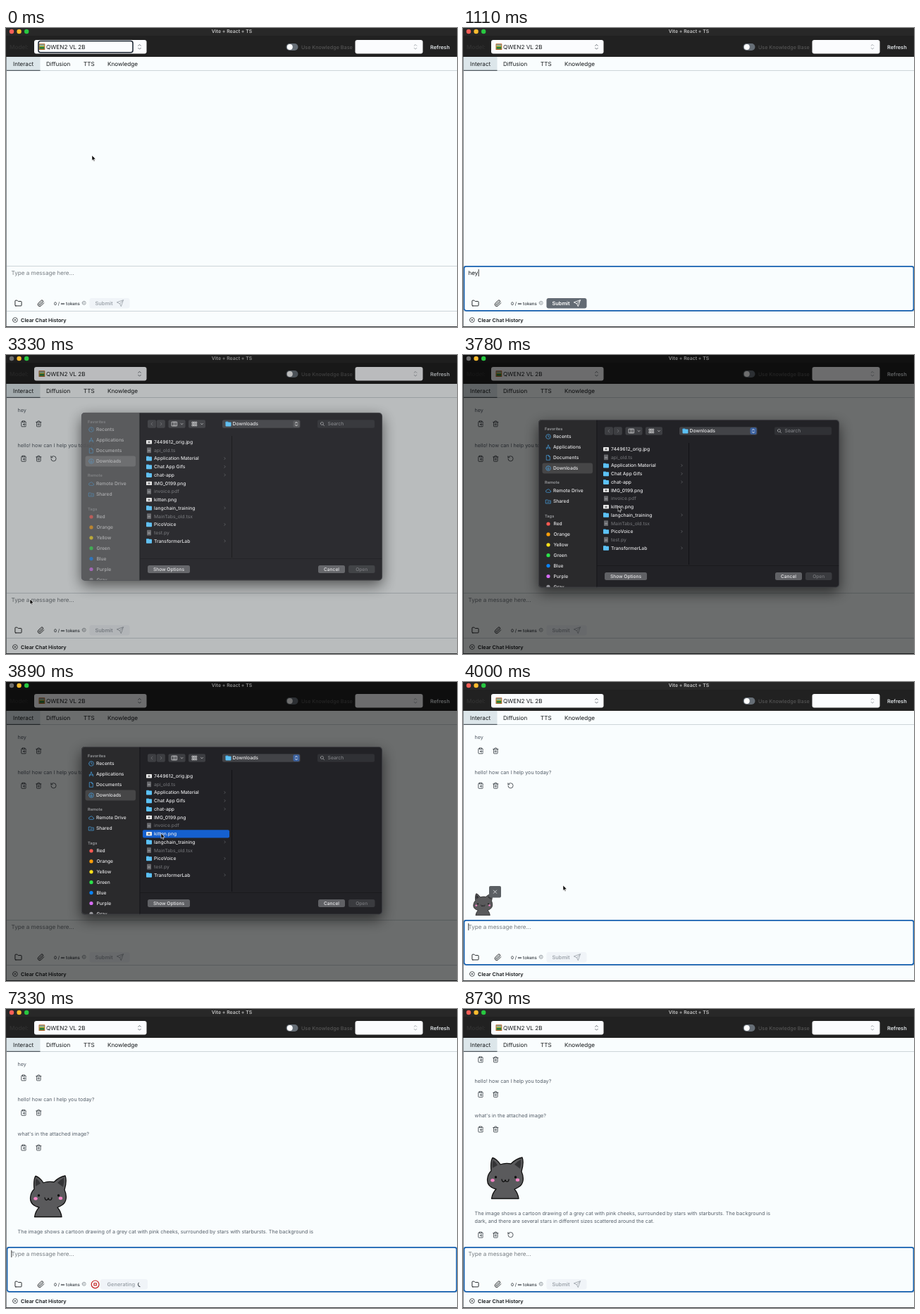
These frames come from a looping animation (640x425 px, 8.91 s). An HTML page:

```html
<!DOCTYPE html>
<html lang="en">
<head>
<meta charset="utf-8">
<title>Chat demo</title>
<style>
html, body { margin: 0; width: 100%; height: 100%; overflow: hidden; background: #f9fdfe; }
svg { display: block; width: 640px; height: 425px; text-rendering: geometricPrecision; }
text { font-family: Inter, "Open Sans", sans-serif; white-space: pre; }
.ico { fill: none; stroke-linecap: round; stroke-linejoin: round; }
</style>
</head>
<body>
<svg id="stage" viewBox="0 0 640 425" xmlns="http://www.w3.org/2000/svg"></svg>
<script>
const LOOP = 8910, STEP = 1000 / 9;

const ICONS = {
  folder: 'M4 20h16a2 2 0 0 0 2-2V8a2 2 0 0 0-2-2h-7.9a2 2 0 0 1-1.7-.9l-.8-1.2A2 2 0 0 0 7.9 3H4a2 2 0 0 0-2 2v13a2 2 0 0 0 2 2Z',
  clip: 'm21.4 11-9.2 9.2a6 6 0 0 1-8.5-8.5l8.6-8.6A4 4 0 1 1 18 8.8l-8.6 8.6a2 2 0 0 1-2.8-2.8l8.5-8.5',
  trash: 'M3 6h18M19 6v14a2 2 0 0 1-2 2H7a2 2 0 0 1-2-2V6M8 6V4a2 2 0 0 1 2-2h4a2 2 0 0 1 2 2v2M10 11v6M14 11v6',
  redo: 'M3 12a9 9 0 1 0 9-9 9.8 9.8 0 0 0-6.7 2.7L3 8M3 3v5h5',
  copy: 'M8 2h8v4H8zM8 4H6a2 2 0 0 0-2 2v14a2 2 0 0 0 2 2h12a2 2 0 0 0 2-2v-2M16 4h2a2 2 0 0 1 2 2v4M21 14H11M15 10l-4 4 4 4',
  send: 'm22 2-7 20-4-9-9-4ZM22 2 11 13',
  sort: 'm7 16 5 5 5-5M7 8l5-5 5 5',
  info: 'M2 12a10 10 0 1 0 20 0a10 10 0 1 0-20 0M12 16v-5M12 8v-.5',
  clear: 'M2 12a10 10 0 1 0 20 0a10 10 0 1 0-20 0M15 9l-6 6M9 9l6 6',
  stop: 'M2 12a10 10 0 1 0 20 0a10 10 0 1 0-20 0M9 9h6v6H9z',
  cross: 'M5 5l14 14M19 5L5 19',
  left: 'm15 5-7 7 7 7', right: 'm9 5 7 7-7 7', down: 'm5 9 7 7 7-7',
  columns: 'M2 4h20v16H2zM9 4v16M15 4v16',
  grid: 'M3 4h4v6H3zM10 4h4v6h-4zM17 4h4v6h-4zM3 14h4v6H3zM10 14h4v6h-4zM17 14h4v6h-4z',
  search: 'M3 10a7 7 0 1 0 14 0a7 7 0 1 0-14 0M15 15l6 6',
  clock: 'M2 12a10 10 0 1 0 20 0a10 10 0 1 0-20 0M12 6v6l4 2',
  apps: 'M12 3 4 21M12 3l8 18M3 15h18',
  page: 'M5 2h9l5 5v15H5zM14 2v5h5',
  save: 'M2 12a10 10 0 1 0 20 0a10 10 0 1 0-20 0M12 6v11M8 13l4 4 4-4',
  cloud: 'M7 19a5 5 0 0 1-1-10a7 7 0 0 1 13 2a4 4 0 0 1 0 8Z',
  shared: 'M2 6h8l2 3h10v12H2zM8 15h8'
};

// Text is placed by the middle of its capitals.
const text = (x, y, size, str, fill, weight = 400, extra = '') =>
  `<text x="${x}" y="${y + size * .36}" font-size="${size}" fill="${fill}" font-weight="${weight}" ${extra}>${str}</text>`;
const rect = (x, y, w, h, fill, r = 0, extra = '') =>
  `<rect x="${x}" y="${y}" width="${w}" height="${h}" rx="${r}" fill="${fill}" ${extra}/>`;
const dot = (x, y, r, fill, extra = '') => `<circle cx="${x}" cy="${y}" r="${r}" fill="${fill}" ${extra}/>`;
const icon = (name, x, y, size, color, weight = 2) =>
  `<path class="ico" d="${ICONS[name]}" stroke="${color}" stroke-width="${weight}" transform="translate(${x - size / 2} ${y - size / 2}) scale(${size / 24})"/>`;
const group = (id, body, extra = '') => `<g id="${id}" ${extra}>${body}</g>`;

const INK = '#171a1c', SOFT = '#555e68', PAGE = '#f9fdfe';

const cat = `
  <path d="M6 20C5 12 6 4 8 1.5C11 2 16 6 19 11Q26 8.5 34 10C38 6 45 2 50 1C52 6 51 14 49 21C53 30 52 39 45 43Q42 45 39 46Q44 52 45 59.5H6.5Q8 51 13 46C5 44 0 40 .6 32Q1 25 6 20Z" fill="#5a5a5c" stroke="#111" stroke-width="1.3" stroke-linejoin="round"/>
  <path d="M8 16Q7 8 9 5Q13 8 15 12ZM39 11Q44 6 48 4Q49 10 47 17Z" fill="#343436"/>
  ${dot(12.5, 29, 1.7, '#0c0c0c')}${dot(40.5, 29, 1.7, '#0c0c0c')}
  <ellipse cx="8" cy="33.5" rx="2.7" ry="2.2" fill="#f584c5"/><ellipse cx="43.5" cy="33" rx="2.7" ry="2.2" fill="#f584c5"/>
  <path d="M21 32Q21.5 36 24 35.5Q26 35 26 32.5Q26.5 35.5 28.5 35.5Q31 35.5 31 32" fill="none" stroke="#0c0c0c" stroke-width="1.2" stroke-linecap="round"/>`;

function header() {
  const picture = rect(46.5, 22.3, 8.8, 8.8, '#b5622c', .6) + rect(47.5, 23.6, 6.8, 6.2, '#e9c84b')
    + rect(47.5, 26.4, 6.8, 3.4, '#2e7d3c') + rect(47.5, 23.6, 6.8, 1.4, '#5aa6c8');
  const tabs = [[10, 'Interact'], [57, 'Diffusion'], [110, 'TTS'], [144, 'Knowledge']];
  return rect(0, 0, 640, 41, '#212121') + rect(0, 0, 640, 11, '#282828')
    + text(5, 27, 8.2, 'Model:', '#323232', 500)
    + rect(40, 17, 159.5, 19.5, '#fbfcfe', 3) + picture
    + text(57, 27, 8.2, 'QWEN2 VL 2B', INK) + icon('sort', 189.5, 26.8, 9, '#444c54')
    + rect(46, 18.6, 134, 16.2, 'none', 3, 'id="pick" stroke="#16202c" stroke-width="1.5"')
    + rect(397.5, 22, 17, 10, '#666e76', 5) + dot(402.8, 27, 4, '#fff')
    + text(419, 27, 7.2, 'Use Knowledge Base', '#555', 500)
    + rect(495.5, 17, 96, 19.5, '#fbfcfe', 3) + icon('sort', 581, 26.8, 9, '#8b9299')
    + text(602, 27, 7.4, 'Refresh', '#dfe3e6', 600)
    + rect(0, 41, 640, 19.5, PAGE) + rect(0, 41, 48.5, 19.5, '#dce6ea')
    + rect(0, 60, 640, 1, '#cdd5d9') + rect(0, 59.8, 48.5, 1.2, '#4c555c')
    + tabs.map(([x, s]) => text(x, 50.7, 8.15, s, INK)).join('');
}

// Window controls and title stay above the sheet's dimming.
function titleBar() {
  return dot(8, 5, 3.2, '#ff5f57', 'id="close"') + dot(18.6, 5, 3.2, '#febc2e') + dot(29.2, 5, 3.2, '#28c840')
    + text(320.5, 4.8, 6.9, 'Vite + React + TS', '#c4c4c4', 600, 'id="title" text-anchor="middle"');
}

function message(id, y, str, iconY, redo) {
  return group(id, (str ? text(16.5, y, 7.2, str, SOFT, 400, 'class="say"') : '')
    + group(id + 'Tools', icon('copy', 25, iconY, 9.6, '#32383e') + icon('trash', 46.3, iconY, 9.6, '#32383e')
      + (redo ? group(id + 'Redo', icon('redo', 67.5, iconY, 9.6, '#32383e')) : '')));
}

function chat() {
  return group('scroll',
    message('ask1', 78, 'hey', 97.8)
    + message('reply1', 128, 'hello! how can I help you today?', 147.3, true)
    + message('ask2', 177.5, "what's in the attached image?", 197)
    + group('photo', cat, 'transform="translate(34 236)"')
    + rect(28, 314, 7.6, 3, '#d5dadd', 1, 'id="wait"')
    + text(16.5, 316.5, 7.2, '', SOFT, 400, 'id="line1"') + text(16.5, 327.7, 7.2, '', SOFT, 400, 'id="line2"')
    + message('reply2', 0, '', 347, true))
    + group('thumb', `<g transform="translate(14.5 300) scale(.53)">${cat}</g>`
      + rect(37, 290, 17, 16.5, '#5b5f63', 2) + icon('cross', 45.5, 298.2, 7.5, '#f4f6f8', 2.4));
}

function composer() {
  return rect(0, 338, 640, 1, '#cdd5d9') + rect(0, 402, 640, 1, '#cdd5d9')
    + rect(1.5, 338.8, 638, 63, 'none', 3, 'id="ring" stroke="#1560b0" stroke-width="1.8"')
    + text(7.5, 348, 8.1, 'Type a message here...', '#777d82', 400, 'id="hint"')
    + text(7.5, 348, 8.1, '', INK, 400, 'id="draft"')
    + rect(7.4, 343, .9, 10, '#222', 0, 'id="caret"')
    + icon('folder', 17.5, 391.3, 11, INK) + icon('clip', 49.6, 391.3, 10.5, INK)
    + text(68, 391.5, 6.2, '0 / ∞ tokens', '#32383e', 500) + icon('info', 110.7, 390.8, 6, '#444c54')
    + group('submit', rect(118.5, 384, 57, 14.5, '#f0f4f8', 3, 'id="face"')
      + `<g id="label">${text(126.5, 391.5, 7.4, 'Submit', 'currentColor', 600)}${icon('send', 162, 391.4, 10.5, 'currentColor')}</g>`)
    + group('busy', rect(134, 384, 67, 14.5, '#f0f4f8', 3) + text(143.5, 391.5, 7.4, 'Generating', '#9fa6ad', 600)
      + `<path id="spin" class="ico" d="M187.5 391.5A3.3 3.3 0 0 1 192.5 388.7" stroke="#3c444b"/>`
      + icon('stop', 126.6, 391.4, 13, '#c41c1c', 2.2))
    + icon('clear', 12.9, 415, 8.2, INK) + text(21, 415, 7.3, 'Clear Chat History', INK, 600)
    + rect(0, 41, 1, 384, '#858b8f') + rect(0, 424, 640, 1, '#3b3f42');
}

function picker() {
  const blue = '#4aa9ee', white = '#e8e8ea', dim = '#6b6c70', btn = '#3d3e42';
  const side = [['clock', 116, 'Recents'], ['apps', 131, 'Applications'], ['page', 146, 'Documents'], ['save', 161, 'Downloads'],
    ['cloud', 193, 'Remote Drive'], ['shared', 208, 'Shared']];
  const tags = [['#ff5a52', 'Red'], ['#ff9f0a', 'Orange'], ['#ffe01b', 'Yellow'], ['#2be34a', 'Green'],
    ['#0a84ff', 'Blue'], ['#d66bf5', 'Purple'], ['#98989d', 'Gray']];
  // Leading mark: + folder, - unavailable file, = picture.
  const files = ['=7449612_orig.jpg', '-api_old.ts', '+Application Material', '+Chat App Gifs', '+chat-app', '=IMG_0199.png',
    '-invoice.pdf', '=kitten.png', '+langchain_training', '-MainTabs_old.tsx', '+PicoVoice', '-test.py', '+TransformerLab'];
  const folder = (x, y) => rect(x, y - 3.4, 4, 2, '#3fa3dc', .6) + rect(x, y - 2.6, 8, 6, '#5cc1f5', .8);
  const rows = files.map((f, i) => {
    const y = 133.6 + i * 11.73, kind = f[0];
    const mark = kind === '+' ? folder(199, y) + icon('right', 310.5, y, 5, '#85868a', 2.4)
      : kind === '-' ? rect(200, y - 3.8, 6, 7.6, '#66676b', .6) + rect(201.3, y - .5, 3.4, 2, '#8d8e92')
      : rect(199, y - 2.6, 8, 5.4, '#ececec', .4) + rect(201.5, y - 1, 3, 2.4, '#77787b');
    return mark + text(210, y, 6.7, f.slice(1), kind === '-' ? dim : white, 500);
  }).join('');
  const heads = [[104.5, 'Favorites'], [181, 'Remote'], [228.5, 'Tags']];
  return group('sheet', rect(107, 92, 427, 238.5, '#222327', 5, 'filter="url(#shadow)"')
    + `<path id="side" d="M190 92H112Q107 92 107 97V325.5Q107 330.5 112 330.5H190Z" fill="#2a2a2c"/>`
    + rect(112.5, 153.5, 71.5, 15, '#ffffff', 3, 'fill-opacity=".13"')
    + `<g id="places" clip-path="url(#sheetClip)">`
    + heads.map(([y, s]) => text(116, y, 5.7, s, '#9a9c9f', 600)).join('')
    + side.map(([n, y, s]) => icon(n, 121, y, 8, blue) + text(128, y, 6.65, s, white, 500)).join('')
    + tags.map(([c, s], i) => dot(121, 240 + i * 14.9, 2.6, c) + text(128.5, 240 + i * 14.9, 6.65, s, white, 500)).join('')
    + '</g>'
    + rect(189.5, 92, .8, 238.5, '#111214') + rect(320.2, 125, .8, 173, '#0f1012') + rect(190, 299, 344, .7, '#17181a')
    + rect(201, 102.3, 12, 11.4, btn, 2) + rect(213.8, 102.3, 12, 11.4, btn, 2)
    + icon('left', 207, 108, 6.5, '#8b8c90') + icon('right', 220, 108, 6.5, '#8b8c90')
    + rect(230.5, 102.3, 24, 11.4, btn, 2) + icon('columns', 239, 108, 8.5, white) + icon('down', 249.5, 108, 5, white, 3)
    + rect(259, 102.3, 24, 11.4, btn, 2) + icon('grid', 267.5, 108, 8.5, white) + icon('down', 278, 108, 5, white, 3)
    + rect(307, 102.3, 110.5, 11.4, '#424347', 2.5) + folder(311.5, 108) + text(321.5, 108, 6.85, 'Downloads', white, 500)
    + rect(407.5, 103.3, 9, 9.4, '#3c62a0', 2, 'id="stepper"') + icon('sort', 412, 108, 7, '#fff', 3)
    + rect(442, 102.3, 81, 11.4, '#303135', 2.5) + icon('search', 449, 108, 7, '#c3c4c7') + text(456.5, 108, 6.85, 'Search', '#8c8d91')
    + rect(194, 210.2, 123, 11.2, '#1560cf', 2, 'id="chosen"') + rows
    + rect(201, 309, 60, 11, '#606165', 2.5) + text(231, 314.5, 6.65, 'Show Options', white, 500, 'text-anchor="middle"')
    + rect(443, 309, 38, 11, '#606165', 2.5) + text(462, 314.5, 6.65, 'Cancel', white, 500, 'text-anchor="middle"')
    + rect(486, 309, 37.5, 11, '#3a3b3f', 2.5) + text(504.7, 314.5, 6.65, 'Open', '#77787c', 500, 'text-anchor="middle"')
    + rect(107.3, 92.3, 426.4, 237.9, 'none', 5, 'stroke="#55575b" stroke-width=".6"'));
}

const stage = document.getElementById('stage');
stage.innerHTML = `<defs><clipPath id="view">${rect(0, 61, 640, 277, '#000')}</clipPath>
  <clipPath id="sheetClip">${rect(107, 92, 83, 238, '#000')}</clipPath>
  <filter id="shadow" x="-15%" y="-20%" width="130%" height="150%"><feDropShadow dx="0" dy="7" stdDeviation="10" flood-color="#000" flood-opacity=".6"/></filter></defs>`
  + rect(0, 0, 640, 425, PAGE) + header() + `<g clip-path="url(#view)">${chat()}</g>` + composer()
  + rect(0, 0, 640, 425, '#000', 0, 'id="shade"') + titleBar() + picker()
  + `<path id="arrow" d="M0 0V7.4L1.7 5.9L2.8 8.5L4 8L2.9 5.4H5.3Z" fill="#000" stroke="#fff" stroke-width=".6"/>
     <path id="beam" class="ico" d="M-1.5-4.5Q0-4.5 0-3.5Q0-4.5 1.5-4.5M0-3.5V3.5M-1.5 4.5Q0 4.5 0 3.5Q0 4.5 1.5 4.5" stroke="#111"/>`;

const ui = {};
stage.querySelectorAll('[id]').forEach(e => ui[e.id] = e);
const say = ui.reply1.querySelector('.say');

const show = (e, on) => { e.style.display = on ? '' : 'none'; };
const within = (k, a, b) => k >= a && k < b;
const typed = (str, part) => str.slice(0, Math.round(str.length * Math.max(0, Math.min(1, part))));

const HELLO = 'hello! how can I help you today?';
const QUERY = "what's in the attached image?";
const ANSWER = [
  'The image shows a cartoon drawing of a grey cat with pink cheeks, surrounded by stars with starbursts. The background is',
  'dark, and there are several stars in different sizes scattered around the cat.'
];

// Pointer stops: step, x, y.
const TRACK = [[0, 122, 181], [2, 118, 190], [6, 19, 355], [22, 19, 355], [25, 49, 390], [28, 46, 388],
  [30, 34, 347], [32, 125, 258], [34, 220, 215], [35, 220, 215], [36, 142, 289]];

function pointer(k) {
  const i = TRACK.findIndex(p => p[0] > k);
  if (i < 0) return TRACK[TRACK.length - 1].slice(1);
  const [a, b] = [TRACK[i - 1], TRACK[i]], f = (k - a[0]) / (b[0] - a[0]);
  return [1, 2].map(n => a[n] + (b[n] - a[n]) * f);
}

function draw(t) {
  const k = Math.floor((t + 5) / STEP);
  const focus = k >= 7 && !within(k, 28, 36);
  const busy = within(k, 11, 18) || within(k, 48, 69);
  const draft = within(k, 8, 11) ? typed('hey', (k - 7) / 3) : within(k, 38, 48) ? typed(QUERY, (k - 37) / 9) : '';

  show(ui.pick, k < 7);
  show(ui.ring, focus);
  show(ui.hint, !draft);
  ui.draft.textContent = draft;
  const blink = k < 69 ? k % 2 === 0 : k < 76 ? k === 69 || k % 2 === 0 : k >= 77 && t < 8730;
  show(ui.caret, focus && (draft || blink));
  ui.caret.setAttribute('x', 7.4 + (draft ? ui.draft.getComputedTextLength() + .4 : 0));

  show(ui.submit, !busy);
  show(ui.busy, busy);
  ui.face.setAttribute('fill', draft ? '#636b74' : '#f0f4f8');
  ui.label.style.color = draft ? '#fff' : '#9fa6ad';
  ui.spin.setAttribute('transform', `rotate(${(k - 56) * 100} 190.7 391.5)`);

  show(ui.ask1, k >= 11);
  show(ui.reply1, k >= 14);
  say.textContent = typed(HELLO, (k - 13) / 5);
  show(ui.reply1Tools, k >= 18);
  show(ui.reply1Redo, k < 48);
  show(ui.ask2, k >= 48);
  show(ui.photo, k >= 48);
  show(ui.thumb, within(k, 36, 48));

  const part = k < 65 ? 0 : (k - 64) / 2;
  ui.line1.textContent = typed(ANSWER[0], part);
  ui.line2.textContent = typed(ANSWER[1], part - 1);
  const first = within(k, 11, 14);
  show(ui.wait, first || within(k, 48, 65));
  ui.wait.setAttribute('y', first ? 127 : 314);
  ui.wait.style.opacity = k % 4 < 2 ? 1 : .6;
  show(ui.reply2, k >= 69);
  ui.scroll.setAttribute('transform', `translate(0 ${k < 67 ? 0 : k < 69 ? -8 : -26})`);

  const open = within(k, 29, 36);
  const fresh = k < 31;
  show(ui.shade, open);
  ui.shade.style.opacity = Math.min(.57, (k - 28) * .13);
  show(ui.sheet, open);
  ui.sheet.style.opacity = k === 29 ? .5 : k === 30 ? .93 : 1;
  ui.sheet.setAttribute('transform', `translate(0 ${k === 29 ? -24 : k === 30 ? -10 : 0})`);
  ui.side.setAttribute('fill', fresh ? '#535456' : '#2a2a2c');
  ui.places.style.opacity = fresh ? .6 : 1;
  ui.stepper.setAttribute('fill', fresh ? '#55565a' : '#3c62a0');
  show(ui.chosen, k === 35);
  ui.close.setAttribute('fill', open ? '#6d6d6d' : '#ff5f57');
  ui.title.setAttribute('fill', within(k, 28, 36) ? '#8c8c8c' : '#c4c4c4');

  const away = within(k, 8, 21) || k >= 38;
  const beam = within(k, 6, 24);
  const at = `translate(${pointer(k)})`;
  show(ui.arrow, !away && !beam);
  show(ui.beam, !away && beam);
  ui.arrow.setAttribute('transform', at);
  ui.beam.setAttribute('transform', at);
}

const start = performance.now();
function tick() {
  draw((performance.now() - start) % LOOP);
  requestAnimationFrame(tick);
}
tick();
</script>
</body>
</html>
```
